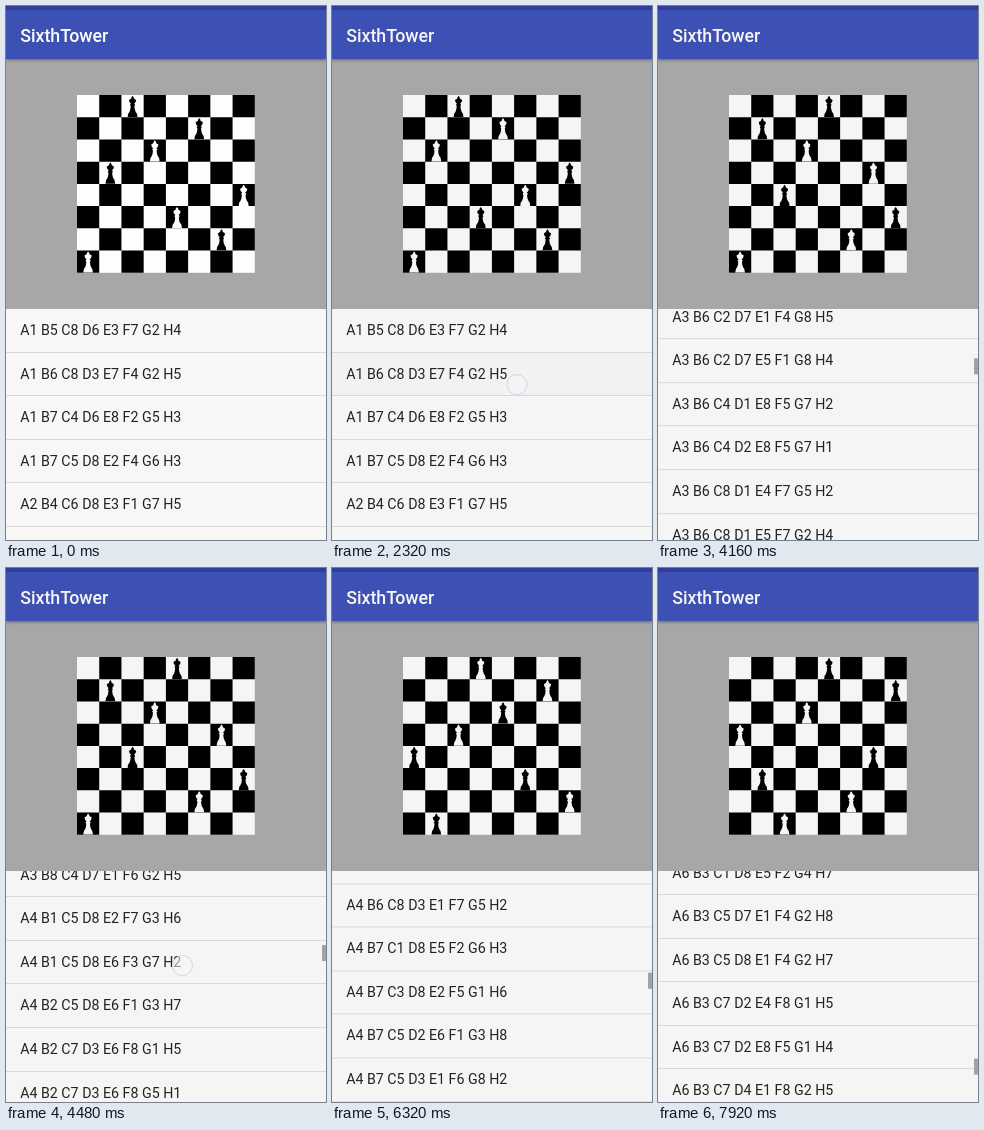
Recreate the animation shown at these times as an HTML page. Size 320 by 534 pixels, loop 8 s.

```html
<!DOCTYPE html>
<html lang="en">
<head>
<meta charset="utf-8">
<title>SixthTower</title>
<style>
  html, body { margin: 0; height: 100%; overflow: hidden; }
  body { position: relative; background: var(--panel); font-family: Roboto, "Liberation Sans", sans-serif; }
  #bar {
    position: absolute; top: 0; left: 0; right: 0; height: 49px; padding-left: 14.2px;
    border-top: 4px solid #303f9f; background: #3d50b4; color: var(--white);
    font: 500 17.8px/51.5px Roboto, "Liberation Sans", sans-serif;
    box-shadow: 0 1px 3px rgba(0, 0, 0, .4);
  }
  #board { position: absolute; left: 71.1px; top: 89.2px; width: 177.8px; height: 177.8px; }
  #view { position: absolute; top: 303px; left: 0; right: 0; bottom: 0; overflow: hidden; background: var(--list); }
  #rows div {
    box-sizing: border-box; height: 43.556px; padding-left: 14.2px; white-space: pre;
    border-bottom: 1px solid #d8d8d8; color: #222; font-size: 14.22px; line-height: 43.6px;
  }
  #rows .hot { background: #f2f2f2; }
  #thumb { position: absolute; top: 0; right: 0; width: 4px; height: 16px; background: #a2a2a2; }
  #dot {
    position: absolute; left: -10.5px; top: -10.5px; width: 21px; height: 21px; box-sizing: border-box;
    border: 1.3px solid #d3d3ea; border-radius: 50%; background: rgba(245, 245, 248, .55);
  }
</style>
</head>
<body>
<div id="bar">SixthTower</div>
<svg id="board" viewBox="0 0 176 176"></svg>
<div id="view"><div id="rows"></div><div id="thumb"></div></div>
<div id="dot"></div>
<script>
const $ = id => document.getElementById(id);
const LOOP = 8000, STEP = 80, CELL = 22;
const PIECE = 'M11 .8L12.2 2.4V3.4L14.6 5Q14.2 8 12.6 8.6L13.6 10 12.8 11Q13 15 14 16.5 15.8 18 15.8 21.8' +
  'H6.2Q6.2 18 8 16.5 9 15 9.2 11L8.4 10 9.4 8.6Q7.8 8 7.4 5L9.8 3.4V2.4Z';

// All placements of eight queens, in lexicographic order
const solutions = [];
(function place(ranks) {
  if (ranks.length === 8) return solutions.push(ranks);
  for (let r = 1; r <= 8; r++) {
    if (ranks.every((q, i) => q !== r && Math.abs(q - r) !== ranks.length - i)) place([...ranks, r]);
  }
})([]);

// A tap without a row only stops the scrolling
const taps = [
  { row: 1, down: 1360, up: 1440, x: 95, y: 378 },
  { row: 1, down: 2160, up: 2400, x: 184.5, y: 378 },
  { row: 2, down: 3040, up: 3120, x: 145, y: 410 },
  { down: 4480, up: 4720, x: 176, y: 397 },
  { row: 29, down: 5120, up: 5280, x: 98, y: 393 },
  { row: 53, down: 7040, up: 7120, x: 135, y: 449 }
];
const flings = [
  { from: 3600, to: 4480, by: 1193 },
  { from: 5920, to: 6800, by: 1003 },
  { from: 7440, to: 7920, by: 824 }
];
const rowTaps = taps.filter(tap => tap.row);

const clamp = v => Math.max(0, Math.min(1, v));
const lerp = (a, b, p) => a + (b - a) * p;
const within = (t, a, b) => t >= a && t <= b;
const mix = (a, b, p) => `rgb(${a.map((v, i) => lerp(v, b[i], p))})`;
const ease = p => (p + p * p * (3 - 2 * p)) / 2;

// After the stopping tap the list creeps on by 4 px
const scrollAt = t => 4 * clamp((t - 4480) / 240) +
  flings.reduce((sum, f) => sum + f.by * ease(clamp((t - f.from) / (f.to - f.from))), 0);

const thumbAt = t => Math.max(...flings.map(f => t <= f.from ? 0 : clamp(1 - (t - f.to - 160) / 240)));

function fingerAt(t) {
  const tap = taps.find(p => within(t, p.down, p.up));
  if (tap) return [tap.x, tap.y];
  const fling = flings.find(f => within(t, f.from + 80, f.from + 240));
  if (!fling) return null;
  const p = (t - fling.from - 80) / 160;
  return [lerp(250, 220.5, p), lerp(531, 371, p)];
}

$('rows').innerHTML = solutions.map(s =>
  `<div>${s.map((r, i) => 'ABCDEFGH'[i] + r).join(' ')}</div>`).join('');
const rows = [...$('rows').children];

let squares = '';
for (let i = 0; i < 64; i++) {
  const x = i % 8, y = i >> 3;
  if ((x + y) % 2) squares += `M${x * CELL} ${y * CELL}h${CELL}v${CELL}h${-CELL}z`;
}

let shown = -1;
function showBoard(n) {
  if (n === shown) return;
  shown = n;
  const pieces = solutions[n].map((r, i) =>
    `<path d="${PIECE}" transform="translate(${i * CELL} ${(8 - r) * CELL})"
      style="fill:${(i + r) % 2 ? 'var(--white)' : '#000'}"/>`);
  $('board').innerHTML =
    `<rect width="176" height="176" style="fill:var(--white)"/><path d="${squares}"/>${pieces.join('')}`;
}

function setColours(p) {
  const css = document.documentElement.style;
  css.setProperty('--white', mix([253, 253, 253], [245, 245, 245], p));
  css.setProperty('--list', mix([248, 247, 245], [245, 245, 245], p));
  css.setProperty('--panel', mix([169, 167, 165], [167, 167, 167], p));
}

function draw(now) {
  const t = Math.floor((now % LOOP) / STEP) * STEP;
  setColours(clamp((t - 320) / 880));

  const done = rowTaps.filter(tap => t >= tap.up + 80);
  showBoard(done.length ? done[done.length - 1].row : 0);

  const hot = rowTaps.find(tap => within(t, tap.down + 80, tap.up + 80));
  rows.forEach((row, i) => row.classList.toggle('hot', !!hot && hot.row === i));

  const scroll = scrollAt(t);
  $('rows').style.transform = `translateY(${-scroll}px)`;
  $('thumb').style.transform = `translateY(${scroll * .062}px)`;
  $('thumb').style.opacity = thumbAt(t);

  const finger = fingerAt(t);
  $('dot').style.display = finger ? '' : 'none';
  if (finger) $('dot').style.transform = `translate(${finger[0]}px, ${finger[1]}px)`;
}

const start = performance.now();
(function frame() {
  draw(performance.now() - start);
  requestAnimationFrame(frame);
})();
</script>
</body>
</html>
```
